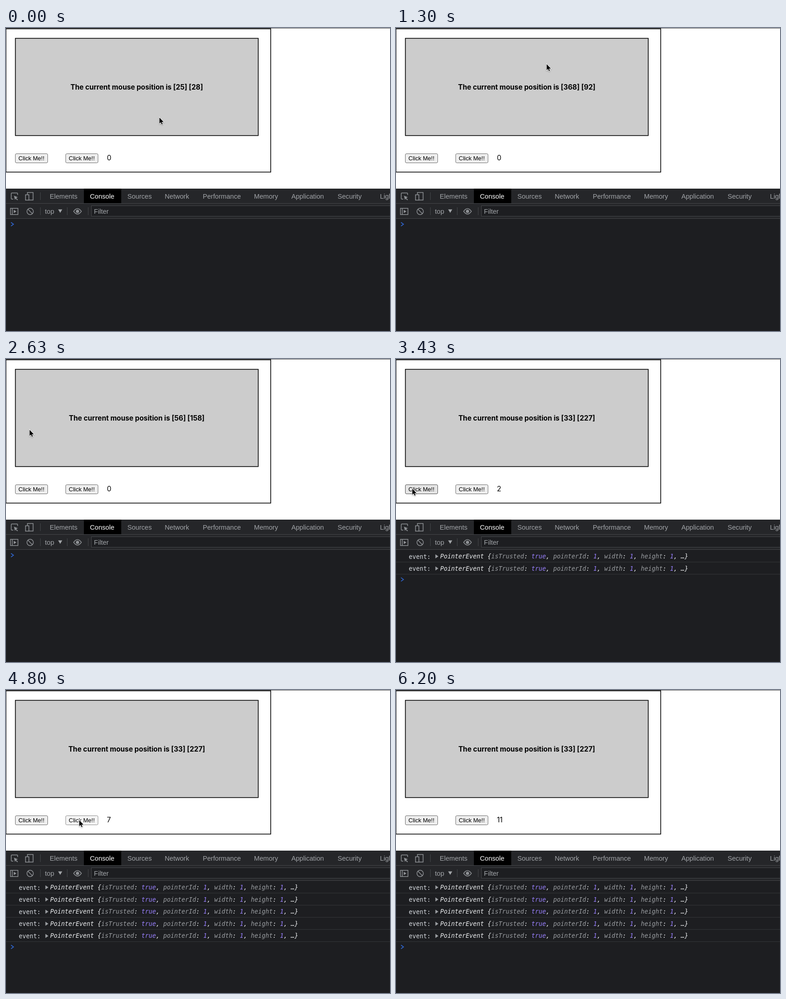
An HTML page for the animation above (6.83 s loop, 843 by 664 pixels).

```html
<!DOCTYPE html>
<html lang="en">
<head>
<meta charset="utf-8">
<title>Mouse position and click counter</title>
<style>
  html, body { margin: 0; width: 100%; height: 100%; overflow: hidden; background: #fff; }
  svg { display: block; }
  text { white-space: pre; }
  .ui { font: 14.6px "Liberation Sans", Arial, sans-serif; fill: #a2a5a9; }
  .page { font: 15.5px Inter, sans-serif; }
  .title { font: bold 15.3px Inter, sans-serif; text-anchor: middle; }
  .button rect { fill: #efefef; stroke: #6b6b6b; }
  .button text { font: 13px "Liberation Sans", Arial, sans-serif; text-anchor: middle; }
  .button.hover rect { fill: #e5e5e5; stroke: #4f4f4f; }
  .button.down rect { fill: #f5f5f5; stroke: #8d8d8d; }
  .icon { fill: none; stroke: #8f9296; stroke-width: 1.5; }
  .rule { stroke: #45474a; fill: none; }
  .log { font: 13.3px "DejaVu Sans Mono", monospace; fill: #d5d9de; }
  .object { font-style: italic; fill: #eceef0; }
  .key { fill: #9a9da1; }
  .value { fill: #9980ff; }
</style>
</head>
<body>
<svg width="843" height="664" viewBox="0 0 843 664">
  <rect width="843" height="1" fill="#555"/>
  <g stroke="#000" stroke-width="1.6">
    <rect x="0" y="1.7" width="581.2" height="314" fill="#fff"/>
    <rect x="20.6" y="22.6" width="533.1" height="213.1" fill="#ccc"/>
  </g>
  <text class="title" id="title" x="287" y="135"></text>
  <g class="button" transform="translate(20 275)">
    <rect x=".5" y=".5" width="71" height="20" rx="2.5"/><text x="35.8" y="15">Click Me!!</text>
  </g>
  <g class="button" transform="translate(130.5 275)">
    <rect x=".5" y=".5" width="71" height="20" rx="2.5"/><text x="35.8" y="15">Click Me!!</text>
  </g>
  <text class="page" id="count" x="221.5" y="290"></text>

  <rect y="352" width="843" height="312" fill="#1d1e21"/>
  <rect y="352" width="843" height="65" fill="#252629"/>
  <rect x="171" y="352" width="82" height="32" fill="#000"/>
  <path class="rule" d="M0 384.5H843M0 417.5H843M75.5 360v17M75.5 393v17M134.5 393v17M180.5 393v17"/>
  <rect class="rule" x="187.5" y="389.5" width="670" height="23" style="fill:#1d1e21"/>
  <g class="ui" id="tabs"></g>
  <g class="ui">
    <text x="85.5" y="407">top</text>
    <text x="193" y="407">Filter</text>
    <path d="M114.5 397.5h9l-4.5 7.5z"/>
  </g>
  <g class="icon">
    <path d="M16 375H13q-1.500 0-1.500-1.500V363q0-1.500 1.500-1.500H24q1.500 0 1.500 1.500v3"/>
    <path d="M17.500 367.500l8.500 3.300-3.600 1.600 3.800 3.800-1.400 1.400-3.800-3.800-1.300 3.200z" fill="#8f9296" stroke="none"/>
    <path d="M47 365v-4.500H59.500V377H51M42.800 365.500h7.500V377.300h-7.500z"/>
    <path d="M9.700 395.200H26.300V408.800H9.700zM13.700 395V409"/>
    <path d="M17 398.500l6 3.500-6 3.500z" fill="#8f9296" stroke="none"/>
    <circle cx="53" cy="402" r="7"/><path d="M48 397l10 10"/>
    <path d="M148.500 401.700q8.500-12 17 0q-8.500 12-17 0z"/>
    <circle cx="157" cy="401.700" r="2.800" fill="#8f9296"/>
  </g>
  <g id="rows"></g>
  <path id="prompt" d="M11 426l5.500 4-5.500 4" fill="none" stroke="#2f66d0" stroke-width="1.6"/>
  <path id="cursor" d="M.8 1.2v13.200l3-2.800 2.100 4.900 2-.9-2.100-4.700h4.200z" stroke="#fff" stroke-width="1.800" paint-order="stroke"
    style="filter:drop-shadow(0 1px 1px #0005)"/>
</svg>
<script>
const LOOP = 6830, FPS = 30, ROW = 26.6, SCALE = 1.03;
const $ = id => document.getElementById(id);

// Cursor path: [frame, x, y]
const path = [
  [4, 336, 195], [11, 270, 135], [18, 190, 170], [25, 245, 246], [31, 380, 210],
  [36, 404, 120], [38, 357, 89], [39, 330, 78], [43, 170, 62], [46, 72, 72],
  [50, 38, 86], [54, 20.4, 82.5], [55, 14, 82], [58, 11, 84], [63, 12, 93],
  [67, 22, 104], [74, 58, 135], [78, 54.4, 153.4], [79, 51, 154], [84, 32, 220.4],
  [88, 34, 281], [91, 35, 283], [121, 35, 283], [124, 123, 289], [128, 160, 284],
  [161, 160, 284], [163, 404, 276], [164, 570, 262], [166, 811, 181],
  [169, 806, 150], [172, 792, 147], [178, 792, 147], [186, 740, -25]
];
// Frames at which the mouse button is released
const clicks = [98, 103, 109, 115, 120, 133, 139, 145, 150, 154, 159];
const PRESS = 2, LOGGED = 5;

const slope = (i, axis) => path[i] && path[i + 1]
  ? (path[i + 1][axis] - path[i][axis]) / (path[i + 1][0] - path[i][0]) : 0;

function tangent(i, axis) {
  const a = slope(i - 1, axis), b = slope(i, axis);
  return a * b > 0 ? 2 * a * b / (a + b) : 0;
}

// Monotone cubic interpolation, so holds stay still
function cursorAt(frame) {
  if (frame <= path[0][0]) return path[0].slice(1);
  const i = path.findIndex(p => p[0] > frame) - 1;
  if (i < 0) return path[path.length - 1].slice(1);
  const span = path[i + 1][0] - path[i][0], u = (frame - path[i][0]) / span;
  const ease = u * u * (3 - 2 * u);
  return [1, 2].map(axis =>
    path[i][axis] * (1 - ease) + path[i + 1][axis] * ease +
    span * u * (1 - u) * ((1 - u) * tangent(i, axis) - u * tangent(i + 1, axis)));
}

const inside = ([x, y], left, top, right, bottom) => x > left && x < right && y > top && y < bottom;

// The readout trails by one frame and keeps the last point in the grey box
function readout(frame) {
  for (let k = frame - 1; k >= 4; k--) {
    const p = cursorAt(k);
    if (inside(p, 20, 22, 554, 236)) return p.map(v => Math.round(v * SCALE));
  }
  return [25, 28];
}

const tabs = { Elements: 96, Console: 184.3, Sources: 266.5, Network: 348.5, Performance: 432,
  Memory: 544.5, Application: 626.5, Security: 728, Lighthouse: 821 };
$('tabs').innerHTML = Object.entries(tabs).map(([name, x]) =>
  `<text x="${x}" y="374"${name === 'Console' ? ' fill="#fff" style="fill:#fff"' : ''}>${name}</text>`).join('');

const fields = Object.entries({ isTrusted: true, pointerId: 1, width: 1, height: 1 })
  .map(([k, v]) => `<tspan class="key">${k}</tspan>: <tspan class="value">${v}</tspan>, `).join('');
$('rows').innerHTML = clicks.slice(0, LOGGED).map((_, i) => `<g class="log" transform="translate(0 ${i * ROW})">
  <text x="28" y="437.700">event:</text>
  <path d="M86.500 428l6.500 4.500-6.500 4.500z" fill="#9a9da1"/>
  <text class="object" x="97" y="437">PointerEvent {${fields}…}</text>
  <path class="rule" d="M0 445H843" style="stroke:#36383b"/></g>`).join('');

const buttons = [...document.querySelectorAll('.button')];
const rows = [...$('rows').children];

function draw(frame) {
  const p = cursorAt(frame), [x, y] = readout(frame);
  const count = clicks.filter(f => f <= frame).length, logs = Math.min(count, LOGGED);
  const pressed = clicks.some(f => frame >= f - PRESS && frame < f);
  $('cursor').setAttribute('transform', `translate(${p})`);
  $('title').textContent = `The current mouse position is [${x}] [${y}]`;
  $('count').textContent = count;
  buttons.forEach((button, i) => {
    const left = 20 + i * 110.5, over = inside(p, left, 275, left + 72, 296);
    button.classList.toggle('hover', over);
    button.classList.toggle('down', over && pressed);
  });
  rows.forEach((row, i) => row.style.display = i < logs ? '' : 'none');
  $('prompt').setAttribute('transform', `translate(0 ${logs * ROW})`);
}

const start = performance.now();
function tick() {
  const time = (performance.now() - start) % LOOP;
  draw(Math.floor((time + 4) * FPS / 1000));
  requestAnimationFrame(tick);
}
tick();
</script>
</body>
</html>
```
